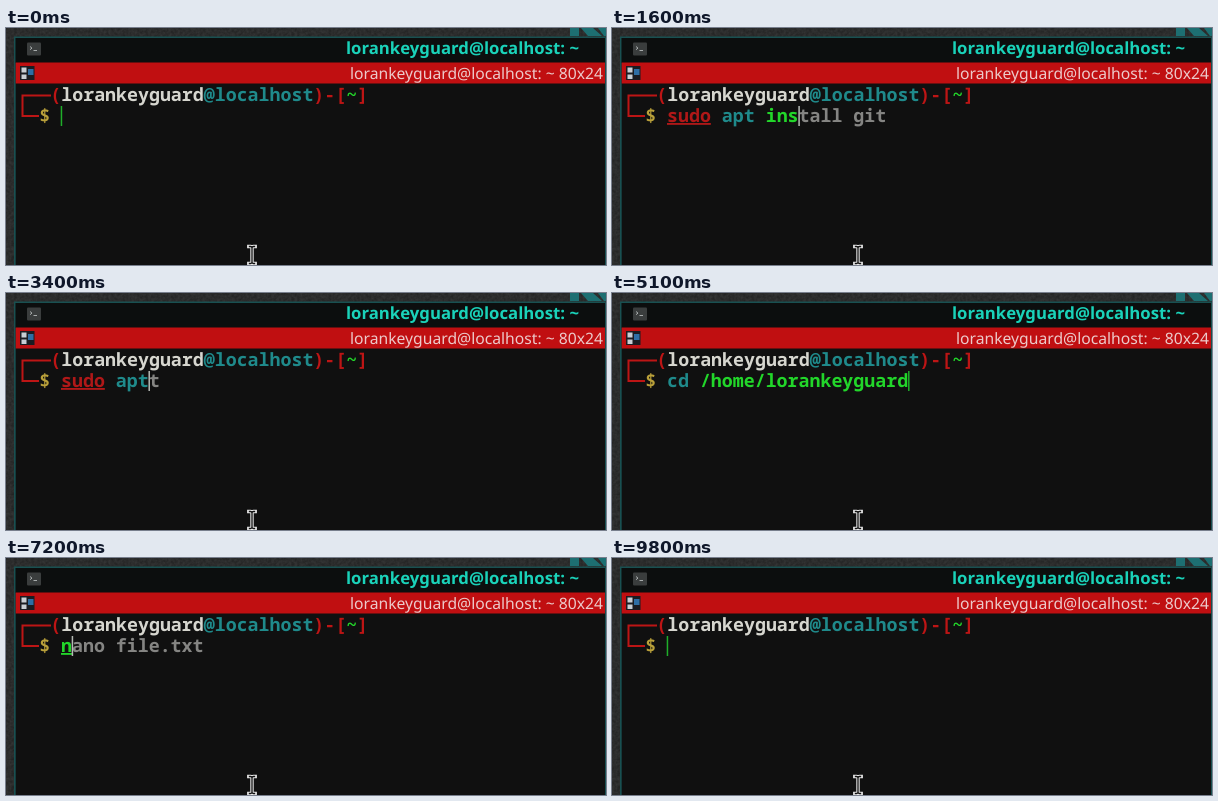
These frames come from a looping animation (600 by 237 pixels, 10 s). An HTML page:

```html
<!DOCTYPE html>
<html lang="en">
<head>
<meta charset="utf-8">
<title>Terminal typing</title>
<style>
  html, body { margin: 0; width: 100%; height: 100%; overflow: hidden; background: #2b2c2c; }
  svg { display: block; width: 600px; height: 237px; }
  text { white-space: pre; text-rendering: geometricPrecision; }
  .bar { font: 15.7px "Noto Sans", "Open Sans", sans-serif; fill: #eccaca; }
  .title { font: bold 16.75px "Noto Sans", "Open Sans", sans-serif; fill: #1ad2b9; }
  .term { font: 600 18.28px "Noto Sans Mono", "DejaVu Sans Mono", monospace; }
  .red { fill: #bd1515; }
  .white { fill: #d6d6cf; }
  .teal, .cmd { fill: #1f8a8b; }
  .green, .arg { fill: #22d62a; }
  .gold { fill: #b9a03a; }
  .pre { fill: #b01818; text-decoration: underline; }
  .unknown { fill: #22d62a; text-decoration: underline; }
  .hint { fill: #858583; }
</style>
</head>
<body>
<svg viewBox="0 0 600 237">
  <defs>
    <filter id="grain" x="0" y="0" width="100%" height="100%">
      <feTurbulence type="fractalNoise" baseFrequency="0.35" numOctaves="2" seed="4"/>
      <feColorMatrix values="0 0 0 0 0  0 0 0 0 0  0 0 0 0 0  .5 0 0 0 -.1"/>
    </filter>
    <path id="beam" d="M242.8 218.5h1.7q1.5 0 1.5 1.5v14q0 1.5-1.5 1.5h-1.7M249.2 218.5h-1.7q-1.5 0-1.5 1.5v14q0 1.5 1.5 1.5h1.7"/>
  </defs>

  <!-- desktop -->
  <rect width="600" height="237" fill="#333434"/>
  <rect width="600" height="237" filter="url(#grain)"/>
  <path d="M564 0h9v8h-9zM575 0h12l9 8h-14zM592 0h8v8h-2z" fill="#1d6f72"/>

  <!-- window -->
  <rect x="8" y="8.5" width="592" height="229" fill="#195051"/>
  <rect x="9.7" y="10" width="589.3" height="227" fill="#101010"/>
  <rect x="9.7" y="10" width="589.3" height="25" fill="#0c0e0e"/>
  <rect x="9.7" y="34.5" width="589.3" height="21" fill="#c00f11"/>

  <rect x="21" y="14.5" width="14" height="13" rx="1" fill="#3a3d3d"/>
  <path d="M24 18.5l2 1.6-2 1.6M27.5 22.5h3.5" fill="none" stroke="#b4b8b8" stroke-width=".9"/>
  <text class="title" x="340" y="25.5">lorankeyguard@localhost: ~</text>

  <rect x="14" y="38" width="14.5" height="14" fill="#1b1c22"/>
  <rect x="15.5" y="39.5" width="5" height="5" fill="#c9ced4"/>
  <rect x="15.5" y="46.5" width="5" height="4.5" fill="#c9ced4"/>
  <rect x="22" y="41" width="5.5" height="6" fill="#2f6ea5"/>
  <text class="bar" x="344" y="51">lorankeyguard@localhost: ~ 80x24</text>

  <!-- prompt -->
  <path d="M45 67.5H16.5V88H33" fill="none" stroke="#bd1515" stroke-width="2"/>
  <text class="term" x="44.3" y="73"><tspan class="red">(</tspan><tspan class="white">lorankeyguard</tspan><tspan class="teal">@localhost</tspan><tspan class="red">)-[</tspan><tspan class="green">~</tspan><tspan class="red">]</tspan></text>
  <text class="term gold" x="33.2" y="94">$</text>
  <text class="term" id="line" x="55" y="94"></text>
  <rect id="caret" y="78" width="1.5" height="20"/>

  <!-- pointer -->
  <g fill="none">
    <use href="#beam" stroke="#e8e8e8" stroke-width="3.4" stroke-linecap="square"/>
    <use href="#beam" stroke="#111" stroke-width="1.3"/>
  </g>
</svg>

<script>
const LOOP = 10000, LEFT = 55, CELL = 10.97;
const REPEAT_DELAY = 260, REPEAT_GAP = 40;

// Type `keys` characters, accept the rest of the hint, then hold backspace.
const scenes = [
  { cmd: "sudo apt install git", start: 480, gap: 100, keys: 20, accept: 2400, erase: 2710 },
  { cmd: "cd /home/lorankeyguard", start: 3980, gap: 200, keys: 3, accept: 4580, erase: 5180 },
  { cmd: "nano file.txt", start: 7080, gap: 150, keys: 4, accept: 7900, erase: 8720 }
];
const styles = { sudo: "pre", su: "cmd", apt: "cmd", cd: "cmd", nano: "cmd" };
const line = document.getElementById("line");
const caret = document.getElementById("caret");

function stateAt(t) {
  const scene = scenes.findLast(s => t >= s.start);
  if (!scene) return { typed: "", hint: "" };
  const { cmd, start, gap, keys, accept, erase } = scene;
  if (t >= erase) {
    const repeats = Math.floor((t - erase - REPEAT_DELAY) / REPEAT_GAP) + 1;
    const left = Math.max(0, cmd.length - 1 - Math.max(0, repeats));
    // The hint is not refreshed while the key is held down.
    return { typed: cmd.slice(0, left), hint: left ? cmd.at(-1) : "" };
  }
  const count = t >= accept ? cmd.length : Math.min(keys, Math.floor((t - start) / gap) + 1);
  return { typed: cmd.slice(0, count), hint: cmd.slice(count) };
}

function span(text, style) {
  const el = document.createElementNS("http://www.w3.org/2000/svg", "tspan");
  el.textContent = text;
  el.setAttribute("class", style);
  return el;
}

function highlight(typed) {
  let wantCommand = true;
  return typed.split(/( )/).filter(Boolean).map(word => {
    if (word === " ") return span(word, "arg");
    const style = wantCommand ? styles[word] || "unknown" : "arg";
    wantCommand = style === "pre";
    return span(word, style);
  });
}

let shown = null;
function draw(now) {
  const { typed, hint } = stateAt(now % LOOP);
  const key = typed + "|" + hint;
  if (key !== shown) {
    shown = key;
    line.replaceChildren(...highlight(typed), span(hint, "hint"));
    caret.setAttribute("x", LEFT + typed.length * CELL - 0.3);
    caret.setAttribute("fill", hint ? "#b4b8b4" : "#1fae2a");
  }
}

const origin = performance.now();
function tick() {
  draw(performance.now() - origin);
  requestAnimationFrame(tick);
}
tick();
</script>
</body>
</html>
```
